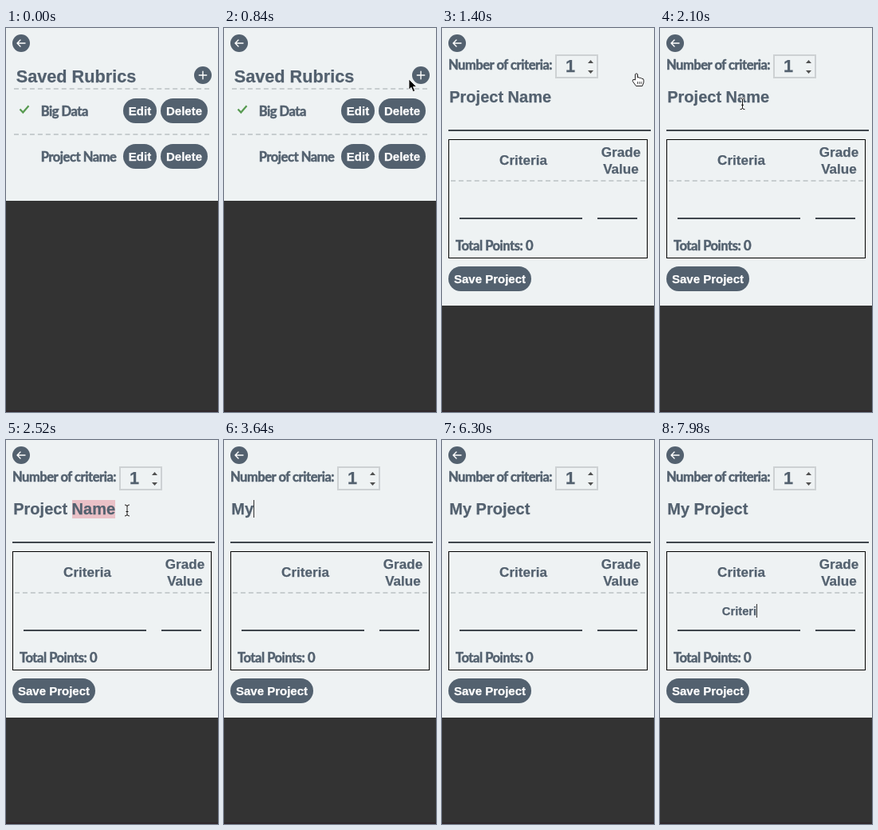
These frames come from a looping animation (266 px wide and 480 px high, 8000 ms). An HTML page:

```html
<!DOCTYPE html>
<html lang="en">
<head>
<meta charset="utf-8">
<title>Saved Rubrics</title>
<style>
html, body { margin: 0; width: 100%; height: 100%; overflow: hidden; background: #333; }
svg { display: block; width: 266px; height: 480px; }
text { font: bold 15px "Liberation Sans", Arial, sans-serif; fill: #53616f; stroke: #53616f; stroke-width: .25; white-space: pre; }
.mid { font-size: 14.7px; text-anchor: middle; }
.btn { fill: #fff; stroke: #fff; text-anchor: middle; }
.slim { font: bold 16.5px Lato, sans-serif; letter-spacing: -0.45px; stroke-width: .55; }
.title { font-size: 21.7px; }
.field { font-size: 20px; }
.head { font-size: 17.1px; text-anchor: middle; }
.slate { fill: #53616f; }
.icon { fill: none; stroke: #fff; stroke-width: 1.4; stroke-linecap: round; stroke-linejoin: round; }
.dash { fill: none; stroke: #c7cdcf; stroke-width: 2; }
.rule { fill: none; stroke: #40474e; stroke-width: 2; }
</style>
</head>
<body>
<svg id="stage" viewBox="0 0 266 480"></svg>
<script>
const LOOP = 8000, STEP = 70, NAME_X = 9.25;

const label = (x, y, str, cls, id = "") =>
  `<text x="${x}" y="${y}" class="${cls}"${id && ` id="${id}"`}>${str}</text>`;
const line = (x1, x2, y) => `<path class="rule" d="M${x1} ${y}H${x2}"/>`;

// Dashes of 6 with a gap near 4, fitted so that the line ends on a dash.
function dashes(x1, x2, y) {
  const len = x2 - x1, n = Math.round((len + 4) / 10);
  const gap = (len - 6 * n) / (n - 1);
  return `<path class="dash" stroke-dasharray="6 ${gap}" d="M${x1} ${y}H${x2}"/>`;
}
const button = (x, y, w, str) =>
  `<rect class="slate" x="${x}" y="${y}" width="${w}" height="31" rx="15.5"/>` +
  label(x + w / 2, y + 21, str, "btn");
const row = (y, name) => label(43.7, y + 22, name, "slim") +
  button(147, y, 42, "Edit") + button(194, y, 59, "Delete");
const disc = (x, y, d) =>
  `<circle class="slate" cx="${x}" cy="${y}" r="11"/><path class="icon" d="${d}"/>`;
const panel = h => `<rect width="266" height="${h}" fill="#eef2f3"/>` +
  disc(19, 19, "M24 19H14M18 15L14 19L18 23");

const list = panel(216) +
  label(12.7, 68, "Saved Rubrics", "title") +
  disc(247, 59, "M242.3 59H251.7M247 54.3V63.7") +
  dashes(10, 255, 76) + dashes(10, 255, 133) +
  `<path d="M17.5 101.5L21.3 105.5L28.5 97.3" fill="none" stroke="#579a50" stroke-width="2.2"/>` +
  row(88, "Big Data") + row(145, "Project Name");

const form = panel(347) +
  label(8, 52, "Number of criteria:", "slim") +
  `<rect x="143" y="34" width="52" height="28" fill="none" stroke="#cdd1d3" stroke-width="2"/>` +
  label(155, 54.5, "1", "title") +
  `<path d="M183 44L186.5 40L190 44ZM183 53L186.5 57L190 53Z" fill="#505050"/>` +
  `<rect id="mark" y="75" height="23" fill="#eac1c7"/>` +
  label(NAME_X, 93, "", "field", "name") + line(8, 262, 128) +
  `<rect x="8.5" y="139.5" width="249" height="148" fill="none" stroke="#000"/>` +
  label(102, 171, "Criteria", "head") +
  label(224.5, 161, "Grade", "head") + label(224.5, 182, "Value", "head") +
  dashes(11, 255, 191) +
  label(99.5, 219, "", "mid", "crit") +
  line(22, 176, 238) + line(195, 245, 238) +
  label(17, 278, "Total Points: 0", "slim") +
  button(8, 298, 104, "Save Project") +
  `<rect id="caret" width="1" fill="#333"/>`;

// Pointers are drawn around their hot spot.
const arrow = `<path d="M0 0V13L3 10.3L5.2 15.6L7.6 14.6L5.4 9.4H9.6Z" fill="#000" stroke="#fff" stroke-width=".8"/>`;
const hand = `<path d="M-1.6 8V.8Q0 -1.2 1.5 .8V5Q3.2 4 4.2 5.6Q6 4.8 6.8 6.4Q9 6 9 8V11L7.3 15.5H-.5L-4.8 9.5Q-5 7 -3 7.4Z" fill="#fff" stroke="#222"/>` +
  `<path d="M1.5 10V13M3.8 10V13M6 10V13" stroke="#222" stroke-width=".8"/>`;
const beamPath = "M-3 -7Q0 -7 0 -5V5Q0 7 -3 7M3 -7Q0 -7 0 -5M3 7Q0 7 0 5M-1.5 1.5H1.5";
const beam = `<path d="${beamPath}" fill="none" stroke="#fff" stroke-width="2.4"/>` +
  `<path d="${beamPath}" fill="none" stroke="#111"/>`;

const $ = id => document.getElementById(id);
$("stage").innerHTML =
  `<rect width="266" height="480" fill="#333"/><rect y="478" width="266" height="2" fill="#30282c"/>` +
  `<g id="list">${list}</g><g id="form">${form}</g>` +
  `<g id="arrow">${arrow}</g><g id="hand">${hand}</g><g id="beam">${beam}</g>`;

const show = (id, on) => $(id).setAttribute("visibility", on ? "visible" : "hidden");
const set = (id, attrs) => { for (const k in attrs) $(id).setAttribute(k, attrs[k]); };

// Pointer stops: time, x, y
const path = [[420, 264, 155], [840, 232, 64], [1190, 244, 57], [1540, 244, 57],
  [1960, 82, 94], [2380, 165, 97], [2490, 152, 88], [3220, 152, 88]];
const keysName = [3220, 3640, 3780, 3990, 4130, 4900, 5040, 5180, 5390, 5460];
const keysCrit = [6510, 6720, 6860, 7350, 7630, 7700, 7980];
const typed = (str, keys, t) => str.slice(0, keys.filter(k => k <= t).length);

function pointer(t) {
  const i = path.findIndex(p => p[0] > t);
  if (i < 1) return null;
  const [t0, x0, y0] = path[i - 1], [t1, x1, y1] = path[i];
  const u = (t - t0) / (t1 - t0), e = u * u * (3 - 2 * u);
  return [x0 + (x1 - x0) * e, y0 + (y1 - y0) * e];
}

function draw(now) {
  const t = Math.floor(now % LOOP / STEP) * STEP;
  const isForm = t >= 1260;
  show("list", !isForm);
  show("form", isForm);

  const name = $("name"), crit = $("crit");
  name.textContent = t < 3220 ? "Project Name" : typed("My Project", keysName, t);
  crit.textContent = typed("Criteri", keysCrit, t);

  const isMarked = t >= 2520 && t < 3220;
  const from = t < 2590 ? 83 : 10;
  show("mark", isMarked);
  set("mark", { x: from, width: 137 - from });

  const inCrit = t >= 5740;
  const blink = t >= 4690 && t < 4900 || t >= 6300 && t < 6510;
  show("caret", t >= 3220 && !blink);
  const end = inCrit ? 99.5 + crit.getComputedTextLength() / 2 : NAME_X + name.getComputedTextLength();
  set("caret", { x: Math.floor(end), y: inCrit ? 205 : 75, height: inCrit ? 17 : 22 });

  const p = pointer(t);
  const kind = !p ? "" : t >= 1050 && t < 1610 ? "hand" : isForm && p[1] > 70 ? "beam" : "arrow";
  for (const id of ["arrow", "hand", "beam"]) {
    show(id, id === kind);
    if (id === kind) set(id, { transform: `translate(${p[0]} ${p[1]})` });
  }
}

function tick() {
  draw(performance.now());
  requestAnimationFrame(tick);
}
tick();
</script>
</body>
</html>
```
